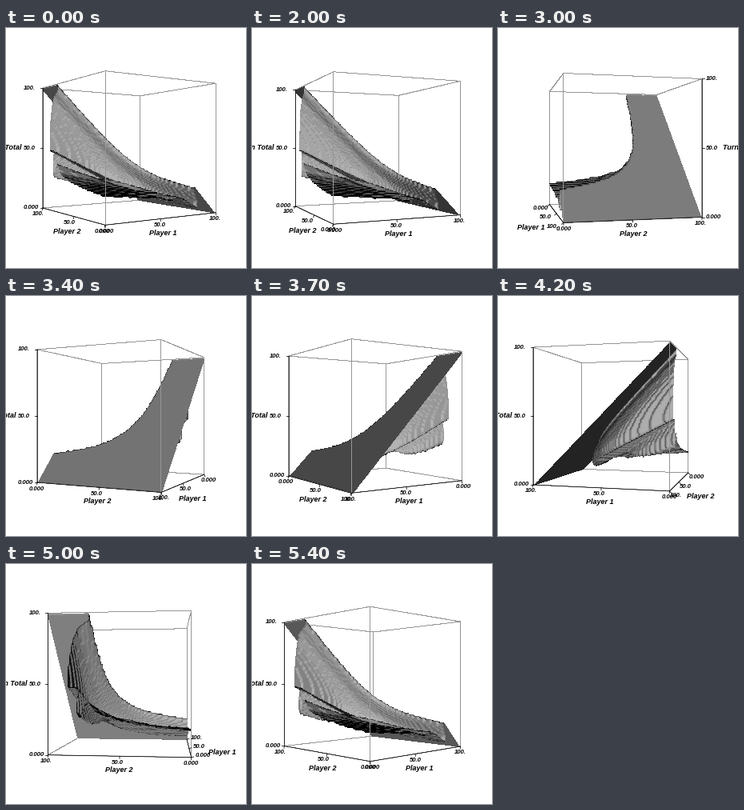
Write a matplotlib script that moves like this. It is 300x300 px and loops after 5.5 s.

```python
from itertools import product

import matplotlib.pyplot as plt
import numpy as np
from matplotlib.animation import FuncAnimation

SIZE = 300
FOCAL, DIST = 559.8, 7.2
STEPS, HOLD = 36, 20
OUTLINE = 150


def roll_region(goal=100, sweeps=100):
    """Optimal play of two-dice Pig: True where rolling beats holding."""
    sums = range(4, 13)
    odds = [(5 - abs(8 - s)) / 36 for s in sums]
    bust = 11 / 36
    start = np.full((goal, goal), 0.5)
    roll_best = np.zeros((goal, goal, goal), bool)
    for _ in range(sweeps):
        hold = np.ones((2 * goal, goal))
        hold[:goal] = 1 - start.T
        value = np.ones((goal + 13, goal, goal))
        for k in range(goal - 1, -1, -1):
            roll = bust * hold[:goal]
            for s, p in zip(sums, odds):
                roll += p * value[k + s]
            bank = hold[k:k + goal]
            roll_best[k] = roll > bank
            value[k] = np.maximum(roll, bank)
        start = value[0]
    return roll_best.transpose(1, 2, 0)


def surface(region):
    """Surface net of the region: sample points in [-1, 1] and their normals."""
    idx = np.arange(-1, 102)
    n = len(idx)
    c = idx.clip(0, 99)
    vol = region[np.ix_(c, c, c)] & (idx[:, None, None] + idx < 99)
    grad = np.stack(np.gradient(vol.astype(np.float32)), axis=-1)

    def corner(o):
        return vol[tuple(slice(a, a + n - 1) for a in o)]

    pos = np.zeros((n - 1, n - 1, n - 1, 3), np.float32)
    count = np.zeros((n - 1, n - 1, n - 1), np.float32)
    for axis, o in product(range(3), product((0, 1), repeat=3)):
        if o[axis]:
            continue
        far = list(o)
        far[axis] = 1
        cross = corner(o) != corner(far)
        count += cross
        for d in range(3):
            pos[..., d] += cross * (0.5 if d == axis else o[d])
    pos /= np.maximum(count, 1)[..., None]
    for d in range(3):
        shape = [1, 1, 1]
        shape[d] = n - 1
        pos[..., d] += idx[:-1].reshape(shape)
    pos = pos.clip(0, 100)

    # One quad around every grid edge that crosses the surface.
    quads, flat = [], []
    step = np.eye(3, dtype=int)
    for axis in range(3):
        b, c = [d for d in range(3) if d != axis]
        e = np.argwhere(np.diff(vol, axis=axis))
        inner = (e[:, [b, c]] >= 1) & (e[:, [b, c]] <= n - 2)
        e = e[inner.all(axis=1)]
        nrm = grad[tuple(e.T)] + grad[tuple((e + step[axis]).T)]
        flat.append(nrm / np.maximum(np.linalg.norm(nrm, axis=1, keepdims=True), 1e-6))
        quads.append(np.stack([e - i * step[b] - j * step[c]
                               for i, j in product((0, 1), repeat=2)]))
    quads = np.concatenate(quads, axis=1)
    flat = np.concatenate(flat)
    cells = [tuple(q.T) for q in quads]

    total = np.zeros(pos.shape[:3] + (4,), np.float32)
    weighted = np.column_stack([flat, np.ones(len(flat), np.float32)])
    for cell in cells:
        np.add.at(total, cell, weighted)
    corners = [pos[cell] for cell in cells]
    smooth = [total[cell][:, :3] / total[cell][:, 3:] for cell in cells]

    points, normals = [], []
    sub = (1 / 6, 1 / 2, 5 / 6)
    for s, t in product(sub, sub):
        w = ((1 - s) * (1 - t), (1 - s) * t, s * (1 - t), s * t)
        points.append(sum(f * q for f, q in zip(w, corners)))
        normals.append((flat + sum(f * q for f, q in zip(w, smooth))) / 2)
    return np.concatenate(points) / 50 - 1, np.concatenate(normals)


def box_lines(samples=220):
    run = np.linspace(-1, 1, samples)
    lines = []
    for axis in range(3):
        for a, b in product((-1, 1), repeat=2):
            line = np.empty((samples, 3))
            line[:, axis] = run
            line[:, [d for d in range(3) if d != axis]] = a, b
            lines.append(line)
    return np.concatenate(lines)


def project(p, turn):
    """Screen x, y and nearness of points for a turntable angle."""
    p = np.asarray(p, float)
    s, c = np.sin(turn), np.cos(turn)
    near = p[..., 0] * c - p[..., 1] * s
    scale = FOCAL / (DIST - near)
    x = SIZE / 2 + (p[..., 0] * s + p[..., 1] * c) * scale
    return x, SIZE / 2 - p[..., 2] * scale, near


def angle(step):
    return np.radians(124 - 10 * step)


net, net_normals = surface(roll_region())
edges = box_lines()
cloud = np.concatenate([net, edges])


def render(step):
    turn = angle(step)
    x, y, near = project(cloud, turn)
    light = np.abs(net_normals[:, 0] * np.cos(turn) - net_normals[:, 1] * np.sin(turn))
    shade = np.concatenate([181 * light, np.full(len(edges), OUTLINE)]).astype(np.uint8)
    near[len(net):] += 0.01
    order = np.argsort(near)
    img = np.full((SIZE, SIZE), 255, np.uint8)
    img[y.astype(int)[order], x.astype(int)[order]] = shade[order]
    return img


views = [render(k) for k in range(STEPS)]

fig = plt.figure(figsize=(3, 3), dpi=100, facecolor="white")
ax = fig.add_axes([0, 0, 1, 1])
ax.axis("off")
picture = ax.imshow(views[0], cmap="gray", vmin=0, vmax=255, aspect="auto",
                    interpolation="nearest", extent=(0, SIZE, SIZE, 0))
ax.set_xlim(0, SIZE)
ax.set_ylim(SIZE, 0)

FONT = dict(family="Liberation Sans", weight="bold", style="italic",
            color="black", va="center")
NAMES = ("Player 1", "Player 2", "Turn Total")
CORNERS = ((-1, -1), (1, -1), (1, 1), (-1, 1))


class Axis:
    """A flat ruler with three ticks, three labels and a title."""

    def __init__(self):
        style = dict(color="black", lw=0.55)
        self.line, = ax.plot([], [], **style)
        self.ticks = [ax.plot([], [], **style)[0] for _ in range(3)]
        self.labels = [ax.text(0, 0, "", size=5.6, ha="left", **FONT)
                       for _ in range(3)]
        self.title = ax.text(0, 0, "", size=6.5, ha="center", **FONT)

    def place(self, a, b, turn):
        dim = next(d for d in range(3) if a[d] != b[d])
        x, y, _ = project([a, b], turn)
        self.line.set_data(x, y)
        mid = np.array([x.mean(), y.mean()])
        out = np.array([y[0] - y[1], x[1] - x[0]])
        out /= np.hypot(*out)
        if out @ (mid - SIZE / 2) < 0:
            out = -out
        texts = ("0.000", "50.0", "100.")
        if a[dim] > b[dim]:
            texts = texts[::-1]
        for f, text, tick, label in zip((0, 0.5, 1), texts, self.ticks, self.labels):
            p = np.array([x[0] + f * (x[1] - x[0]), y[0] + f * (y[1] - y[0])])
            tick.set_data(*np.transpose([p, p + 3 * out]))
            label.set_position(p + out * (14.5, 8) - (9.5, 0))
            label.set_text(text)
        side = abs(out[0])
        reach = 27 + 16 * side + (5 if dim == 2 else 0)
        drop = 0 if dim == 2 else 17 * out[1] + 9 * side
        self.title.set_position(mid + (out[0] * reach, drop))
        self.title.set_text(NAMES[dim])


rulers = [Axis() for _ in range(3)]


def update(frame):
    step = max(0, frame - HOLD + 1)
    turn = angle(step)
    picture.set_data(views[step])

    base = [(*c, -1) for c in CORNERS]
    x, y, near = project(base, turn)
    front = int(np.argmax(near))
    left, right = (front - 1) % 4, (front + 1) % 4
    # The upright ruler stands left unless the front corner is nearer bottom left.
    reach = np.hypot(x, SIZE - y)
    post = right if reach[front] < reach[left] else left

    rulers[0].place(base[left], base[front], turn)
    rulers[1].place(base[front], base[right], turn)
    rulers[2].place(base[post], (*CORNERS[post], 1), turn)
    return []


anim = FuncAnimation(fig, update, frames=STEPS + HOLD - 1, interval=100,
                     repeat=True, repeat_delay=0, blit=False)
plt.show()
```
